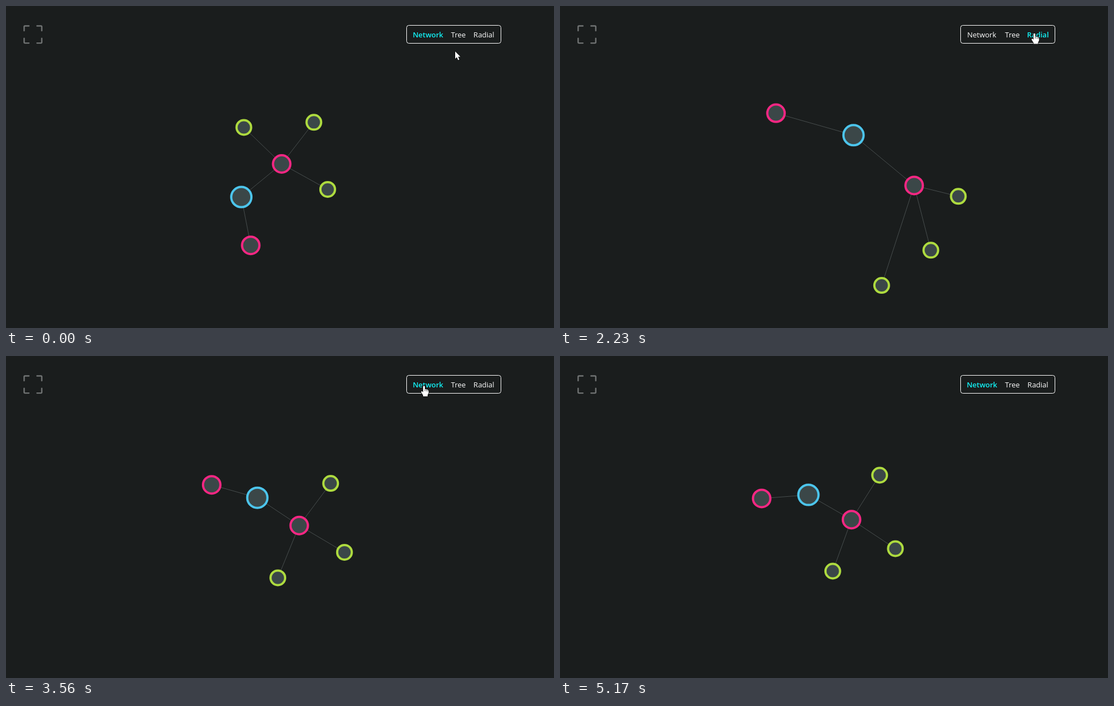
An HTML page with a canvas that plays this animation: 976 px wide and 574 px high, repeating every 5.28 s.

```html
<!DOCTYPE html>
<html lang="en">
<head>
<meta charset="utf-8">
<title>Graph layouts</title>
<style>
  html, body { margin: 0; width: 100%; height: 100%; overflow: hidden; background: #1a1d1d; }
  canvas { display: block; }
</style>
</head>
<body>
<canvas id="stage" width="976" height="574"></canvas>
<script>
const ctx = document.getElementById('stage').getContext('2d');
const LOOP = 5280, STEP = 101.4, LAST = 51;
const ACTIVE = '#12f2f6';

const BLUE = { color: '#4cc5ec', r: 18 };
const PINK = { color: '#f62783', r: 15.5 };
const GREEN = { color: '#aedb3f', r: 13 };
// root, its leaf child, the hub, three hub children
const kinds = [BLUE, PINK, PINK, GREEN, GREEN, GREEN];
const parents = [null, 0, 0, 2, 2, 2];

const children = [0, 1, 2];
const lerp = (a, b, u) => a + (b - a) * u;
const polar = ([x, y], r, degrees) => {
  const a = degrees * Math.PI / 180;
  return [x + r * Math.cos(a), y + r * Math.sin(a)];
};

// The hub sits in the middle, everything else hangs on spokes around it.
function network(hub, { root, length, leaf, spokes, stretch = 0 }) {
  const rootAt = polar(hub, length, root);
  return [rootAt, polar(rootAt, length * 0.944, leaf), hub,
    ...spokes.map((angle, i) => polar(hub, 93.7 + (i === 2 ? stretch : 0), angle))];
}

// One row per generation.
function tree() {
  return [[498.5, 152], [428, 286.5], [540, 296.5],
    ...children.map(i => [524.5 + 75 * (1 - i), 440])];
}

// One ring per generation.
function radial({ root, leaf, hub, first, gap }) {
  const center = [488, 287];
  return [polar(center, 66.5, root), polar(center, 141, leaf), polar(center, 146.5, hub),
    ...children.map(i => polar(center, 227.5, first + gap * i))];
}

const smooth = u => u * u * (3 - 2 * u);
const easeOut = u => 1 - (1 - u) ** 2;
const decay = u => (1 - Math.exp(-5.5 * u)) / (1 - Math.exp(-5.5));
const spring = u => 1 - Math.exp(-5.6 * u) * Math.cos(2.5 * Math.PI * u);
const linear = u => u;

const layouts = [
  { pose: network([491, 281.5], { root: 140.6, length: 93, leaf: 79, spokes: [-52.3, 29, 224] }) },
  { start: 6.4, end: 15, ease: spring, pose: tree() },
  { start: 19, end: 22, ease: smooth, pose: radial({ root: -58.5, leaf: 222.9, hub: 13, first: 13.3, gap: 27.4 }) },
  { start: 22, end: 31, ease: decay, pose: radial({ root: -65, leaf: 226.3, hub: 6.9, first: -9.5, gap: 29.2 }) },
  { start: 31.4, end: 35, ease: smooth, pose: network([522.2, 302.2],
    { root: 213.6, length: 89.5, leaf: 195.8, spokes: [-53.3, 30.6, 112.2], stretch: 7 }) },
  { start: 35, end: 43, ease: decay, pose: network([523.8, 292.6],
    { root: 208.6, length: 89.5, leaf: 178, spokes: [-58.9, 34.4, 111.1], stretch: 7 }) },
  { start: 43, end: 51, ease: linear, pose: network([519.2, 291.7],
    { root: 209.9, length: 88.5, leaf: 175.6, spokes: [-57.7, 33.5, 110], stretch: 4 }) }
];

const pointerStops = [
  { pose: [800, 81] },
  { start: 0, end: 5, ease: linear, pose: [803, 52] },
  { start: 15, end: 19, ease: easeOut, pose: [845, 48.5] },
  { start: 24, end: 35, ease: decay, pose: [744.5, 53] },
  { start: 37, end: 45, ease: easeOut, pose: [910, 576] }
];

const mix = (a, b, u) => Array.isArray(a) ? a.map((v, i) => mix(v, b[i], u)) : lerp(a, b, u);

function poseAt(stops, step) {
  let i = stops.length - 1;
  while (i > 0 && stops[i].start > step) i--;
  if (!i) return stops[0].pose;
  const { start, end, ease, pose } = stops[i];
  return mix(stops[i - 1].pose, pose, ease(Math.min(1, (step - start) / (end - start))));
}

function drawGraph(nodes) {
  ctx.strokeStyle = '#474d4d';
  ctx.lineWidth = 1;
  nodes.forEach((node, i) => {
    if (parents[i] === null) return;
    ctx.beginPath();
    ctx.moveTo(...nodes[parents[i]]);
    ctx.lineTo(...node);
    ctx.stroke();
  });
  ctx.fillStyle = '#3b4748';
  ctx.lineWidth = 4;
  nodes.forEach(([x, y], i) => {
    ctx.strokeStyle = kinds[i].color;
    ctx.beginPath();
    ctx.arc(x, y, kinds[i].r, 0, 2 * Math.PI);
    ctx.fill();
    ctx.stroke();
  });
}

function drawFrameIcon() {
  ctx.strokeStyle = '#707373';
  ctx.lineWidth = 2.4;
  ctx.lineCap = 'round';
  for (const sx of [-1, 1]) for (const sy of [-1, 1]) {
    const x = 48 + sx * 15.7, y = 50.8 + sy * 15.3;
    ctx.beginPath();
    ctx.moveTo(x - sx * 8.5, y);
    ctx.arcTo(x, y, x, y - sy * 8.5, 1.5);
    ctx.lineTo(x, y - sy * 8.5);
    ctx.stroke();
  }
  ctx.lineCap = 'butt';
}

function drawMenu(active) {
  ctx.strokeStyle = '#fff';
  ctx.lineWidth = 1;
  ctx.beginPath();
  ctx.roundRect(713.5, 34.5, 168, 32, 4);
  ctx.stroke();
  for (const [text, x] of [['Network', 725.2], ['Tree', 792.6], ['Radial', 832.6]]) {
    const on = text === active;
    ctx.font = `${on ? 600 : 500} 13px "Open Sans", "Noto Sans", sans-serif`;
    ctx.fillStyle = on ? ACTIVE : '#fff';
    ctx.fillText(text, on ? x - 0.8 : x, 55.8);
  }
}

const arrow = new Path2D('M0 0V13L3 10.2L5.2 15.4L7.4 14.4L5.2 9.6H9.4Z');
const hand = new Path2D('M-1.6 1.2Q0 -.8 1.5 1.2V6.2Q3 5.4 4.2 6.8Q5.6 6.2 6.6 7.6Q8.2 7.4 8.2 9.4V13L6.4 16.4V19H-1.6V17L-5 11.8Q-5.4 9.6 -3.4 9.8L-1.6 11.4Z');
const knuckles = new Path2D('M1.5 6.5V9.5M4.2 7.2V9.8M6.5 8V10.2');

function drawPointer([x, y]) {
  const hovering = x > 713 && x < 882 && y > 34 && y < 67;
  const shape = hovering ? hand : arrow;
  ctx.save();
  ctx.translate(x, y);
  ctx.lineJoin = 'round';
  ctx.lineWidth = 1.6;
  ctx.strokeStyle = '#080a0a';
  ctx.stroke(shape);
  ctx.fillStyle = '#fff';
  ctx.fill(shape);
  ctx.lineWidth = 0.7;
  if (hovering) ctx.stroke(knuckles);
  ctx.restore();
}

function activeLabel(step) {
  if (step < 7 || step >= 32) return 'Network';
  return step < 20 ? 'Tree' : 'Radial';
}

function render(time) {
  // motion advances in steps of roughly a tenth of a second
  const step = Math.min(LAST, Math.floor((time % LOOP + 20) / STEP));
  ctx.fillStyle = '#1a1d1d';
  ctx.fillRect(0, 0, 976, 574);
  drawFrameIcon();
  drawGraph(poseAt(layouts, step));
  drawMenu(activeLabel(step));
  drawPointer(poseAt(pointerStops, step));
}

let origin;
function tick(now) {
  origin ??= now;
  render(now - origin);
  requestAnimationFrame(tick);
}
render(0);
requestAnimationFrame(tick);
</script>
</body>
</html>
```
